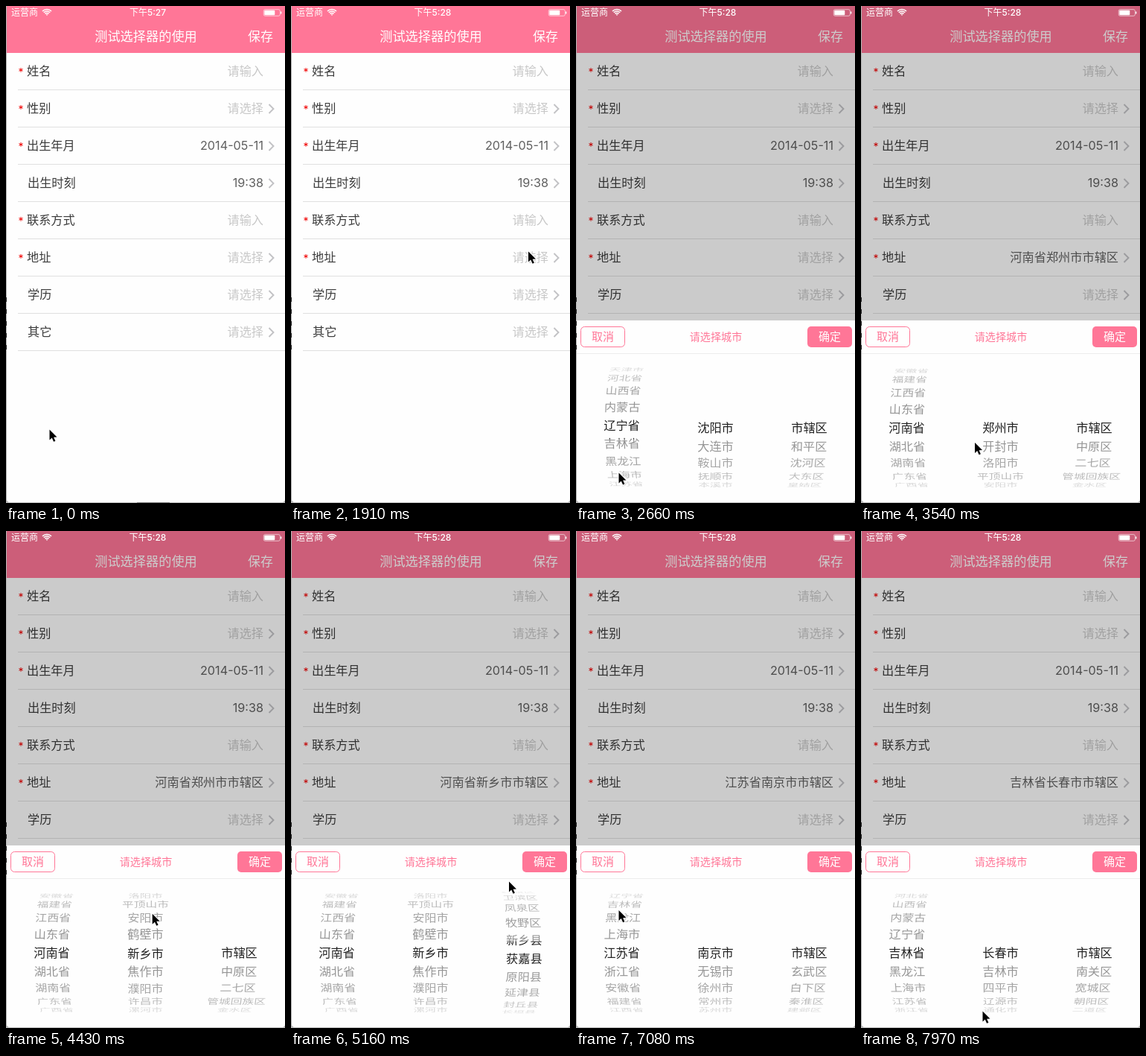
These frames come from a looping animation (375 by 667 pixels, 8000 ms). An HTML page with a canvas:

```html
<!DOCTYPE html>
<html lang="zh-CN">
<head>
<meta charset="utf-8">
<title>测试选择器的使用</title>
<style>
html, body { margin: 0; width: 100%; height: 100%; overflow: hidden; background: #fefefe; }
canvas { display: block; width: 375px; height: 667px; }
</style>
</head>
<body>
<canvas id="stage"></canvas>
<script>
const W = 375, H = 667, LOOP = 8000, STEP = 147.4;
const PINK = '#ff7697', PAPER = '#fefefe';
const FONT = 'Inter, "Noto Sans CJK SC", "Noto Sans CJK JP", "Noto Sans CJK", sans-serif';
const canvas = document.getElementById('stage');
const c = canvas.getContext('2d');
const dpr = window.devicePixelRatio || 1;
canvas.width = W * dpr;
canvas.height = H * dpr;

const list = s => s.split(' ');
const PROVINCES = list('北京市 天津市 河北省 山西省 内蒙古 辽宁省 吉林省 黑龙江 上海市 江苏省 浙江省 安徽省 福建省 江西省 山东省 河南省 湖北省 湖南省 广东省 广西省 海南省 重庆市 四川省');
const CITIES = {
  辽宁省: list('沈阳市 大连市 鞍山市 抚顺市 本溪市'),
  河南省: list('郑州市 开封市 洛阳市 平顶山市 安阳市 鹤壁市 新乡市 焦作市 濮阳市 许昌市 漯河市 三门峡市 南阳市'),
  江苏省: list('南京市 无锡市 徐州市 常州市 苏州市'),
  吉林省: list('长春市 吉林市 四平市 辽源市 通化市')
};
const AREAS = {
  沈阳市: list('市辖区 和平区 沈河区 大东区 皇姑区'),
  郑州市: list('市辖区 中原区 二七区 管城回族区 金水区'),
  新乡市: list('市辖区 红旗区 卫滨区 凤泉区 牧野区 新乡县 获嘉县 原阳县 延津县 封丘县 长垣县 卫辉市'),
  南京市: list('市辖区 玄武区 白下区 秦淮区 建邺区'),
  长春市: list('市辖区 南关区 宽城区 朝阳区 二道区')
};

// Each swipe spins one wheel to a row; the form follows once it has settled
const SWIPES = [
  { at: 2650, col: 0, to: 15 },
  { at: 3830, col: 1, to: 6 },
  { at: 4720, col: 2, to: 6 },
  { at: 6141, col: 0, to: 9 },
  { at: 7080, col: 0, to: 6 }
];
const FIRST_ROW = 5, SPIN = 700, SETTLE = 730, DRAG = 240, SHEET_AT = 1931;

const clamp = u => Math.min(1, Math.max(0, u));
const smooth = u => u * u * (3 - 2 * u);
const easeOut = u => 1 - (1 - u) ** 3;

// Cursor stops [time, x, y]: the wander before the sheet opens, then the drags
const STOPS = [
  [0, 58, 568], [295, 139, 540], [560, 139, 540], [1700, 318.5, 329], [2200, 318.5, 329],
  [3537, 152.5, 585.5], [7959, 163, 644]
];
SWIPES.forEach(({ at, col, to }, i) => {
  const x = [57, 160, 292.5][col], up = i < 3;
  const end = up ? 470 : 655;
  STOPS.push([at, x, up ? 628 : 507], [at + DRAG, x, end], [at + 2 * DRAG, x, end]);
});
STOPS.sort((a, b) => a[0] - b[0]);

function cursorAt(t) {
  const i = STOPS.findIndex(s => s[0] > t);
  if (i < 0) return STOPS[STOPS.length - 1].slice(1);
  const a = STOPS[i - 1], b = STOPS[i], u = (t - a[0]) / (b[0] - a[0]);
  return [1, 2].map(j => a[j] + (b[j] - a[j]) * u);
}

function pickerAt(t) {
  const rows = [FIRST_ROW, 0, 0];
  const done = SWIPES.filter(s => t >= s.at + SETTLE);
  for (const s of done) {
    rows[s.col] = s.to;
    rows.fill(0, s.col + 1);
  }
  const province = PROVINCES[rows[0]];
  const cities = CITIES[province], city = cities[rows[1]];
  const areas = AREAS[city];
  const address = done.length ? province + city + areas[rows[2]] : '';
  const spin = SWIPES[done.length];
  if (spin && t > spin.at) {
    rows[spin.col] += (spin.to - rows[spin.col]) * easeOut(clamp((t - spin.at) / SPIN));
  }
  return { rows, address, lists: [PROVINCES, cities, areas] };
}

function box(x, y, w, h, color) {
  c.fillStyle = color;
  c.fillRect(x, y, w, h);
}

// y is the optical middle of the line
function label(s, x, y, size, color, align = 'left', weight = 400) {
  c.font = `${weight} ${size}px ${FONT}`;
  c.textAlign = align;
  c.fillStyle = color;
  c.fillText(s, x, Math.round(y + size * 0.37));
}

function path(points, color, width) {
  c.beginPath();
  points.forEach(([x, y]) => c.lineTo(x, y));
  c.strokeStyle = color;
  c.lineWidth = width;
  c.stroke();
}

function clipped(y, h, draw) {
  c.save();
  c.beginPath();
  c.rect(0, y, W, h);
  c.clip();
  draw();
  c.restore();
}

function round(x, y, w, h, r) {
  c.beginPath();
  c.roundRect(x, y, w, h, r);
}

function drawForm(address) {
  box(0, 0, W, H, PAPER);
  box(0, 0, W, 63, PINK);
  label('测试选择器的使用', 188, 41, 17.2, '#fff', 'center', 500);
  label('保存', 359, 41, 17, '#fff', 'right');
  const rows = [
    ['姓名', 1, '', '请输入'], ['性别', 1, '', '请选择'], ['出生年月', 1, '2014-05-11'], ['出生时刻', 0, '19:38'],
    ['联系方式', 1, '', '请输入'], ['地址', 1, address, '请选择'], ['学历', 0, '', '请选择'], ['其它', 0, '', '请选择']
  ];
  rows.forEach(([name, must, value, hint], i) => {
    const y = 87.5 + i * 50;
    if (must) label('*', 16.5, y + 1.5, 14, '#f00000');
    label(name, must ? 28 : 29, y, 16.2, '#3c3c3c');
    label(value || hint, 346, y, 16.2, value ? '#606060' : '#c8c8c8', 'right');
    if (hint !== '请输入') path([[353.5, y - 5.5], [359.5, y + 0.5], [353.5, y + 6.5]], '#c2c2c5', 1.9);
    box(16, 112 + i * 50, W - 16, 1, '#e0e0e0');
  });
}

function drawStatus(t) {
  label('运营商', 7, 9, 12, '#fff');
  label(t < 1170 ? '下午5:27' : '下午5:28', 190.5, 9, 12, '#fff', 'center', 500);
  c.strokeStyle = c.fillStyle = '#fff';
  c.lineWidth = 1.6;
  for (let r = 1; r < 9; r += 2.5) {
    c.beginPath();
    c.arc(55, 13, r, -Math.PI * 0.75, -Math.PI * 0.25);
    c.stroke();
  }
  c.lineWidth = 0.6;
  round(346.3, 4.7, 22, 8.6, 2);
  c.stroke();
  round(347.3, 5.7, 14, 6.6, 1);
  c.fill();
  box(369, 7.5, 1.3, 3, '#fff');
}

function drawWheel(items, pos, x, mid, dark) {
  const R = 89, TURN = 16.3 * Math.PI / 180, DEPTH = 970;
  items.forEach((item, i) => {
    const a = (i - pos) * TURN;
    if (Math.abs(a) > 1.38) return;
    const sin = Math.sin(a), cos = Math.cos(a);
    const s = DEPTH / (DEPTH + R * (1 - cos)), dx = x - 187.5;
    c.save();
    c.transform(s, 0, -dx * s * s * sin / DEPTH, s * cos, 187.5 + dx * s, mid + R * sin * s);
    c.globalAlpha = dark ? 1 : 0.5 * cos ** 1.2;
    label(item, 0, 0, 16.2, '#222', 'center');
    c.restore();
  });
}

function drawSheet(top, { lists, rows }) {
  box(0, top, W, H - top, PAPER);
  box(0, top + 44, W, 1, '#ececec');
  round(6.5, top + 8.5, 59, 27, 5);
  c.strokeStyle = PINK;
  c.lineWidth = 1;
  c.stroke();
  label('取消', 36, top + 21.8, 15, PINK, 'center');
  label('请选择城市', 188, top + 21.8, 14.1, PINK, 'center');
  round(311, top + 8, 60, 28, 5);
  c.fillStyle = PINK;
  c.fill();
  label('确定', 341, top + 21.8, 15, '#fff', 'center');

  const mid = top + 144, band = 15.5, reach = 82;
  const wheels = dark => lists.forEach((items, i) => drawWheel(items, rows[i], 61.5 + i * 126, mid, dark));
  clipped(mid - reach, reach - band, () => wheels(false));
  clipped(mid - band, 2 * band, () => wheels(true));
  clipped(mid + band, reach - band, () => wheels(false));
}

function drawEdges(t) {
  box(0, 0, 1, H, '#b4b4b4');
  for (let y = 391; y < 464; y += 16) box(0, y, 1, 6, '#222');
  box(0, H - 1, W, 1, '#bcbcbc');
  if (t < 580) box(176, H - 1, 44, 1, '#777');
  c.fillStyle = '#a8a8a8';
  for (const [x, dir] of [[1, 1], [W, -1]]) {
    c.beginPath();
    c.moveTo(x, H - 5);
    c.quadraticCurveTo(x, H - 1, x + dir * 4, H - 1);
    c.lineTo(x, H - 1);
    c.fill();
  }
}

function drawCursor(x, y) {
  c.save();
  c.translate(x + 0.5, y + 0.5);
  c.beginPath();
  for (const p of [[0, 0], [0, 14], [3.2, 11], [5.6, 16.2], [7.9, 15.2], [5.6, 10.2], [10, 10]]) c.lineTo(...p);
  c.closePath();
  c.lineJoin = 'round';
  c.lineWidth = 2;
  c.strokeStyle = '#fff';
  c.stroke();
  c.fillStyle = '#000';
  c.fill();
  c.restore();
}

function draw(now) {
  // The screen refreshes in even steps; 12 ms absorbs their rounding
  const t = Math.floor((now % LOOP + 12) / STEP) * STEP;
  const picker = pickerAt(t);
  c.setTransform(dpr, 0, 0, dpr, 0, 0);
  drawForm(picker.address);
  if (t > SHEET_AT) {
    box(0, 0, W, H, 'rgba(0,0,0,.2)');
    drawSheet(Math.round(H - 245 * smooth(clamp((t - SHEET_AT) / 300))), picker);
  }
  drawStatus(t);
  drawEdges(t);
  drawCursor(...cursorAt(t));
}

const start = performance.now();
function tick() {
  draw(performance.now() - start);
  requestAnimationFrame(tick);
}
tick();
</script>
</body>
</html>
```
